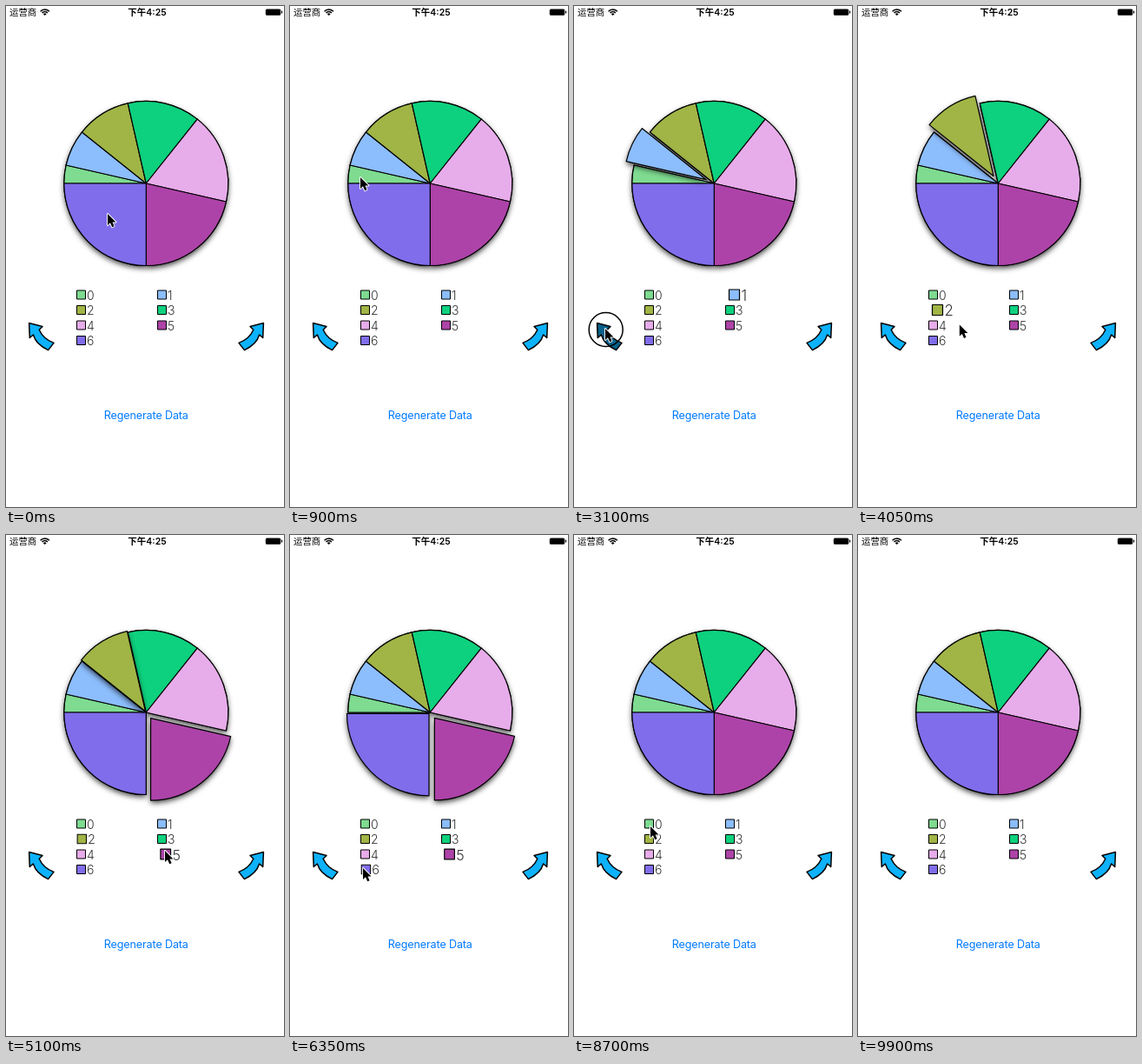
Write an HTML page with a canvas that moves like this. It is 320 by 576 pixels and loops after 9.95 s.

```html
<!DOCTYPE html>
<html lang="zh-CN">
<head>
<meta charset="utf-8">
<style>
html, body { margin: 0; width: 100%; height: 100%; overflow: hidden; background: #fff; }
canvas { display: block; }
</style>
</head>
<body>
<canvas id="stage" width="320" height="576"></canvas>
<script>
const ctx = document.getElementById('stage').getContext('2d');
const LOOP = 9950, STEP = 50, POP_TIME = 200;
const COLORS = ['#7edb90', '#8cbdfc', '#a0b546', '#0dd17e', '#e7acea', '#ad43a8', '#806deb'];
const FONT = 'Inter, "Noto Sans CJK SC", "Noto Sans CJK", sans-serif';

// [time, selected slice]
const SELECTIONS = [[1000, 0], [2600, 1], [3250, 2], [4950, 5], [6295, 6], [7500, 0], [8500, -1]];
const PRESSES = [[2450, 2600], [3050, 3250]];
// [time, x, y]
const CURSOR = [
  [0, 117, 239], [250, 117, 239], [800, 81, 197], [1150, 81, 197], [1650, 65, 291],
  [2200, 36, 371], [3500, 36, 371], [4500, 183, 363], [5300, 183, 363],
  [6050, 84, 383], [6600, 84, 383], [7300, 88, 335], [9000, 88, 335]
];

const ease = x => {
  x = Math.min(1, Math.max(0, x));
  return x * x * (3 - 2 * x);
};

function popAmount(index, t) {
  let amount = 0;
  SELECTIONS.forEach(([start, selected], k) => {
    if (selected !== index) return;
    amount += ease((t - start) / POP_TIME) - ease((t - SELECTIONS[k + 1][0]) / POP_TIME);
  });
  return amount;
}

function setShadow(on) {
  ctx.shadowColor = on ? 'rgba(0,0,0,.75)' : 'transparent';
  ctx.shadowBlur = on ? 6 : 0;
  ctx.shadowOffsetY = on ? 3 : 0;
}

function drawSlice(i, amount, shadow) {
  // Slice values run 1 to 7, out of 28, clockwise from the left.
  const unit = Math.PI * 2 / 28;
  const from = Math.PI + unit * i * (i + 1) / 2;
  const to = from + unit * (i + 1);
  const mid = (from + to) / 2;
  const x = 161.3 + Math.cos(mid) * 10 * amount;
  const y = 204 + Math.sin(mid) * 10 * amount;
  ctx.beginPath();
  ctx.moveTo(x, y);
  ctx.arc(x, y, 94.5, from, to);
  ctx.closePath();
  ctx.fillStyle = COLORS[i];
  setShadow(shadow);
  ctx.fill();
  setShadow(false);
  ctx.strokeStyle = '#000';
  ctx.lineWidth = 1.2;
  ctx.stroke();
}

function drawPie(pops) {
  pops.forEach((p, i) => p || drawSlice(i, 0, true));
  pops.forEach((p, i) => p || drawSlice(i, 0, false));
  pops.forEach((p, i) => p && drawSlice(i, p, true));
}

function text(str, x, y, size, { color = '#000', weight = 400, align = 'left', spacing = 0 } = {}) {
  ctx.font = `${weight} ${size}px ${FONT}`;
  ctx.letterSpacing = spacing + 'px';
  ctx.textAlign = align;
  ctx.fillStyle = color;
  ctx.fillText(str, x, y);
}

function drawLegend(pops) {
  pops.forEach((p, i) => {
    ctx.save();
    ctx.translate(86.5 + 93 * (i % 2) + 5 * p, 332 + 17.5 * Math.floor(i / 2));
    ctx.scale(1 + .2 * p, 1 + .2 * p);
    ctx.fillStyle = COLORS[i];
    ctx.fillRect(-5, -5, 10, 10);
    ctx.strokeStyle = '#000';
    ctx.lineWidth = 1;
    ctx.strokeRect(-5, -5, 10, 10);
    text(i, 6.6, 5.6, 14, { color: '#333', weight: 300 });
    ctx.restore();
  });
}

const arrowPath = new Path2D(
  'M26.6 364.6 L42 368.4 L38.2 372.3 Q43 383 55 387.4 L48.6 395.6 Q34.5 389 31.4 378 L27.3 381.4 Z');

function drawArrow(mirrored, pressed) {
  ctx.save();
  if (mirrored) {
    ctx.translate(323, 0);
    ctx.scale(-1, 1);
  }
  ctx.fillStyle = pressed ? '#08618a' : '#0db2fb';
  ctx.strokeStyle = '#000';
  ctx.lineWidth = 1.5;
  ctx.fill(arrowPath);
  ctx.stroke(arrowPath);
  if (pressed) {
    ctx.beginPath();
    ctx.arc(36.7, 372, 19.5, 0, Math.PI * 2);
    ctx.stroke();
  }
  ctx.restore();
}

function drawStatusBar() {
  text('运营商', 4, 11, 10.4);
  text('下午4:25', 162.5, 11, 10.5, { weight: 600, align: 'center' });
  ctx.strokeStyle = ctx.fillStyle = '#000';
  ctx.lineWidth = 1.5;
  for (const r of [4.4, 7]) {
    ctx.beginPath();
    ctx.arc(44.7, 11, r, -Math.PI * .76, -Math.PI * .24);
    ctx.stroke();
  }
  ctx.beginPath();
  ctx.moveTo(44.7, 11);
  ctx.arc(44.7, 11, 2.6, -Math.PI * .76, -Math.PI * .24);
  ctx.fill();
  ctx.beginPath();
  ctx.roundRect(298.8, 3.4, 17.4, 7.4, 1.5);
  ctx.roundRect(316.9, 5.6, 1.2, 3, .5);
  ctx.fill();
}

const cursorPath = new Path2D('M0 0 V13 L3 10.3 L5.2 15.3 L7.6 14.2 L5.5 9.5 H9.5 Z');

function drawCursor(t) {
  const k = CURSOR.findIndex(key => key[0] > t);
  if (k < 0) return;
  const [t0, x0, y0] = CURSOR[k - 1], [t1, x1, y1] = CURSOR[k];
  const p = (t - t0) / (t1 - t0);
  ctx.save();
  ctx.translate(x0 + (x1 - x0) * p, y0 + (y1 - y0) * p);
  ctx.strokeStyle = '#fff';
  ctx.lineWidth = 1.8;
  ctx.stroke(cursorPath);
  ctx.fillStyle = '#000';
  ctx.fill(cursorPath);
  ctx.restore();
}

function draw() {
  const t = Math.floor(performance.now() % LOOP / STEP) * STEP;
  const pops = COLORS.map((_, i) => popAmount(i, t));
  ctx.fillStyle = '#fff';
  ctx.fillRect(0, 0, 320, 576);
  ctx.lineJoin = 'round';
  drawStatusBar();
  drawPie(pops);
  drawLegend(pops);
  drawArrow(false, PRESSES.some(([from, to]) => t >= from && t < to));
  drawArrow(true, false);
  text('Regenerate Data', 161.3, 475.2, 12.6, { color: '#007aff', align: 'center', spacing: -.15 });
  drawCursor(t);
  requestAnimationFrame(draw);
}
draw();
</script>
</body>
</html>
```
